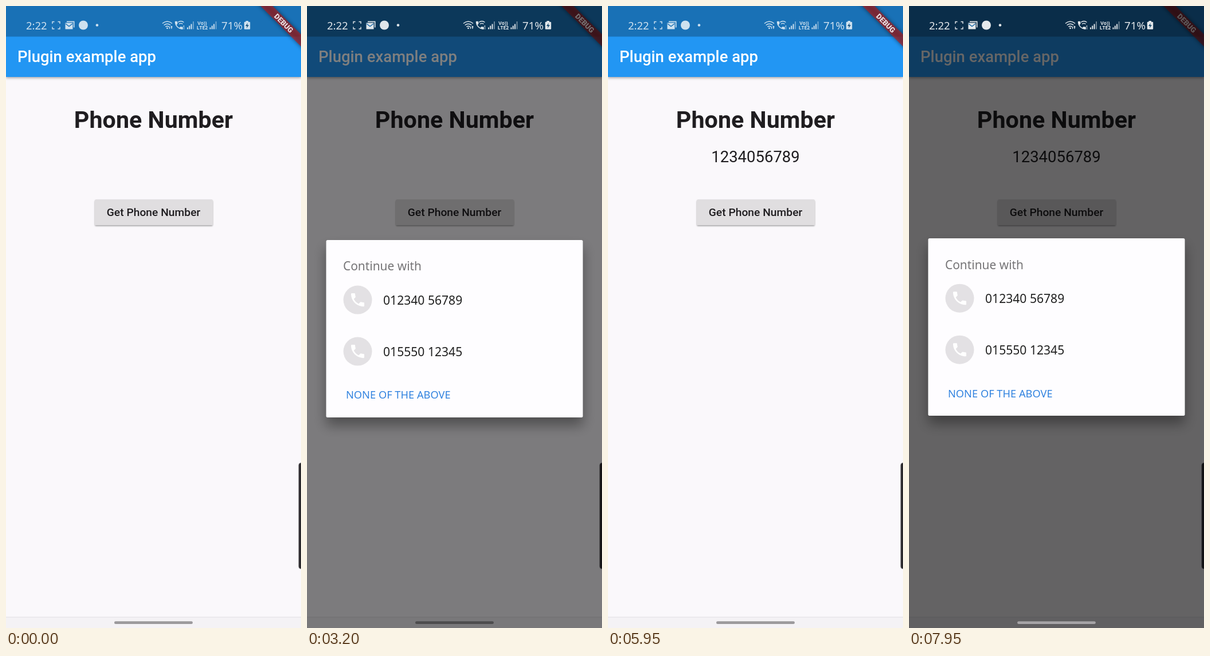
Recreate the animation shown at these times as an HTML page. Size 515x1087 px, loop 8 s.

```html
<!DOCTYPE html>
<html lang="en">
<head>
<meta charset="utf-8">
<title>Phone number picker</title>
<style>
  html, body { margin: 0; width: 100%; height: 100%; overflow: hidden; background: #faf8fb; }
  svg { display: block; width: 100%; height: 100%; }
  text { font-family: Roboto, sans-serif; }
  .system text, #dialog text { font-family: "Noto Sans", "Open Sans", sans-serif; }
  .medium { font-weight: 500; }
  .middle { text-anchor: middle; }
  .line { fill: none; stroke: #fff; }
</style>
</head>
<body>
<svg viewBox="0 0 515 1087">
  <defs>
    <filter id="barShadow" x="-5%" y="-20%" width="110%" height="160%">
      <feDropShadow dx="0" dy="2" stdDeviation="2.2" flood-opacity=".32"/>
    </filter>
    <filter id="buttonShadow" x="-5%" y="-20%" width="110%" height="150%">
      <feDropShadow dx="0" dy="1.6" stdDeviation="1.2" flood-opacity=".35"/>
    </filter>
    <filter id="dialogShadow" x="-15%" y="-15%" width="130%" height="140%">
      <feDropShadow dx="0" dy="14" stdDeviation="11" flood-opacity=".36"/>
    </filter>
    <filter id="soft" x="-20%" y="-80%" width="140%" height="260%">
      <feGaussianBlur stdDeviation="3.5"/>
    </filter>
    <path id="handset" d="M6.62 10.79c1.44 2.83 3.76 5.14 6.59 6.59l2.2-2.2c.27-.27.67-.36 1.02-.24 1.12.37 2.33.57 3.57.57.55 0 1 .45 1 1V20c0 .55-.45 1-1 1-9.39 0-17-7.61-17-17 0-.55.45-1 1-1h3.5c.55 0 1 .45 1 1 0 1.25.2 2.45.57 3.57.11.35.03.74-.25 1.02z"/>
    <path id="signal" d="M0 11h2v3H0zM3.3 8h2v6h-2zM6.6 5h2v9h-2z"/>
    <g id="caller">
      <circle r="25" fill="#e3e1e4"/>
      <use href="#handset" fill="#fff" transform="scale(1.28) translate(-12 -12)"/>
    </g>
  </defs>

  <rect width="515" height="1087" fill="#faf8fb"/>
  <rect width="515" height="124" fill="#2196f3" filter="url(#barShadow)"/>
  <rect width="515" height="53.5" fill="#1971b6"/>
  <text class="medium" x="20" y="98" font-size="27.5" fill="#fff">Plugin example app</text>

  <g class="middle" fill="#1f1d20">
    <text x="257.5" y="213" font-size="41.25" font-weight="700">Phone Number</text>
    <text id="result" x="257.5" y="273" font-size="27.5">1234056789</text>
    <rect x="155" y="338" width="206" height="45" rx="2.5" fill="#e0dee0" filter="url(#buttonShadow)"/>
    <text class="medium" x="257.5" y="367" font-size="19.25">Get Phone Number</text>
  </g>

  <g transform="translate(515 0) rotate(45)">
    <rect x="-60" y="35" width="120" height="15" opacity=".5" filter="url(#soft)"/>
    <rect x="-60" y="35" width="120" height="15" fill="#b71c1c" opacity=".627"/>
    <text class="middle" y="47" font-size="12.75" font-weight="900" fill="#fff" opacity=".85">DEBUG</text>
  </g>

  <rect x="511" y="798.5" width="12" height="185" rx="4" fill="#2b292c" stroke="#77757a" stroke-width=".8"/>
  <rect y="1068" width="515" height="19" fill="#f4f2f5"/>
  <rect y="1067.5" width="515" height="1" fill="#e2e0e3"/>
  <rect x="189" y="1075.3" width="137" height="4.8" rx="2.4" fill="#9b999c"/>

  <rect id="dim" width="515" height="1087"/>
  <rect id="lightHandle" x="189" y="1075.3" width="137" height="4.8" rx="2.4" fill="#a7a5a8"/>

  <g id="status" class="system" fill="#fff">
    <text x="35" y="40.5" font-size="18.5">2:22</text>
    <path class="line" stroke-width="1.4" d="M81 31v-3.5h3.5M90.500 27.500h3.500v3.500M94 36.500v3.500h-3.500M84.500 40h-3.500v-3.500"/>
    <path d="M106 26.500h13.500v11h-1.600v-9.300H106z"/>
    <path d="M103.500 29.500h13v11h-13z"/>
    <path fill="none" stroke="#1971b6" stroke-width="1.4" d="M104 31l6 4.500 6-4.500"/>
    <circle cx="135" cy="33.500" r="8"/>
    <circle cx="159" cy="33.500" r="2.300"/>

    <g class="line" stroke-width="1.5">
      <path d="M273 30.500q8.500-7 17 0M275.700 33.500q5.800-4.500 11.600 0M278.400 36.300q3.100-2.200 6.200 0"/>
      <path stroke-width="1.300" d="M285.500 40v-4M289 35.500v4.500M287.700 37l1.300-1.500 1.300 1.500"/>
      <path stroke-width="1.300" d="M300 28.500q5.500-4 10.500 0M302 31.500q3.200-2.200 6.500 0"/>
    </g>
    <circle cx="281.500" cy="38.800" r="1.400"/>
    <use href="#handset" transform="translate(292.500 24.500) scale(.78)"/>
    <text x="308" y="40.500" font-size="9">1</text>
    <use href="#signal" x="316" y="26.500"/>
    <path d="M326.200 27h1.800v13.500h-1.800z" opacity=".5"/>
    <text class="middle" x="342.500" y="32.500" font-size="8.500" font-weight="600">Vo))</text>
    <text class="middle" x="342.500" y="40.700" font-size="8.700" font-weight="600">LTE2</text>
    <use href="#signal" x="355.500" y="26.500"/>
    <path d="M365.700 27h1.800v13.500h-1.800z" opacity=".5"/>
    <text x="376" y="40.500" font-size="18.800">71%</text>
    <path d="M418.500 26h4.500v1.800h2.200q1 0 1 1v11q0 1-1 1h-8.400q-1 0-1-1v-11q0-1 1-1h1.700z"/>
    <path fill="#174b70" d="M422 29.500l-4 5.500h2.800l-1 4 4.200-5.700h-2.900z"/>
  </g>

  <g id="dialog">
    <rect x="33.500" width="448" height="310" rx="2.500" fill="#fefdff" filter="url(#dialogShadow)"/>
    <text x="63" y="53.500" font-size="20.900" fill="#757476">Continue with</text>
    <use href="#caller" x="88.500" y="104.700"/>
    <text x="133" y="113" font-size="21.100" fill="#202020">012340 56789</text>
    <use href="#caller" x="88.500" y="194.700"/>
    <text x="133" y="203" font-size="21.100" fill="#202020">015550 12345</text>
    <text x="68" y="277.500" font-size="18.250" fill="#3183df">NONE OF THE ABOVE</text>
  </g>
</svg>
<script>
  const LOOP = 8000, OPEN_MS = 300, CLOSE_MS = 250;
  const FIRST_OPEN = 2950, CLOSE = 5400, SECOND_OPEN = 7095, RESULT = 5600;
  const DIALOG_TOP = 406, SLIDE = 109, MAX_DIM = 0.6;

  const part = id => document.getElementById(id);
  const [dim, lightHandle, status, dialog, result] =
    ['dim', 'lightHandle', 'status', 'dialog', 'result'].map(part);
  const ramp = (t, start, length) => Math.min(1, Math.max(0, (t - start) / length));
  const show = (node, visible) => node.setAttribute('visibility', visible ? 'visible' : 'hidden');

  function draw(t) {
    const opening = ramp(t, t < CLOSE + CLOSE_MS ? FIRST_OPEN : SECOND_OPEN, OPEN_MS);
    const closing = t < CLOSE + CLOSE_MS ? ramp(t, CLOSE, CLOSE_MS) : 0;
    const shade = MAX_DIM * opening * (1 - closing);
    const offset = SLIDE * ((1 - opening) ** 2 + closing ** 2);

    dim.setAttribute('opacity', shade);
    status.setAttribute('opacity', 0.79 + shade * 0.17);
    dialog.setAttribute('transform', `translate(0 ${DIALOG_TOP + offset})`);
    dialog.setAttribute('opacity', Math.min(1, opening * 6) * (1 - closing));
    show(dialog, shade > 0);
    show(lightHandle, opening === 1 && closing === 0);
    show(result, t >= RESULT);
  }

  function tick() {
    draw(performance.now() % LOOP);
    requestAnimationFrame(tick);
  }
  tick();
</script>
</body>
</html>
```
